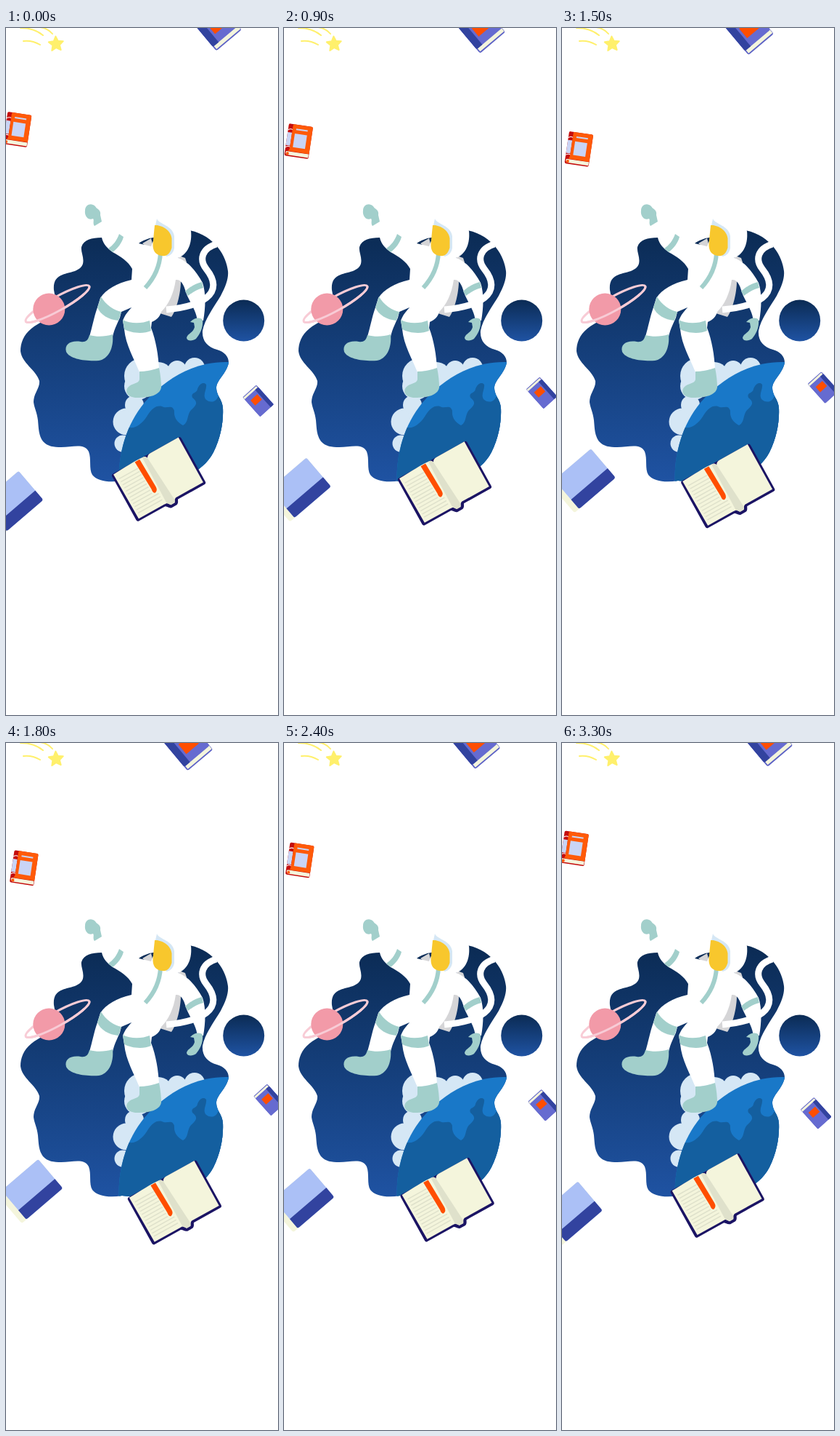
Recreate the animation shown at these times as an HTML page. Size 375x944 px, loop 3600 ms.

```html
<!DOCTYPE html>
<html lang="en">
<head>
<meta charset="utf-8">
<title>Floating books</title>
<style>
  html, body { margin: 0; width: 100%; height: 100%; overflow: hidden; background: #fff; }
  svg { display: block; width: 100%; height: 100%; }
  .teal { fill: #a2cfcb; }
  .cream { fill: #f4f5dc; }
  .line { fill: none; }
</style>
</head>
<body>
<svg viewBox="0 0 375 944" preserveAspectRatio="xMinYMin meet">
  <defs>
    <linearGradient id="night" x1="0" y1="0" x2="0" y2="1">
      <stop offset="0" stop-color="#0b2b54"/>
      <stop offset="1" stop-color="#1f53a3"/>
    </linearGradient>
    <path id="blob" d="M132 288C118 288 107 291 104 301C103 308 108 315 106 324C102 335 88 335 78 339C69 342 65 349 66 360C68 372 71 380 67 389C61 400 46 404 35 413C24 422 20 433 20 444C22 461 41 469 46 485C47 495 38 502 38 514C39 522 43 529 44 539C45 550 45 560 51 568C57 575 66 576 76 576C92 576 108 570 114 582C118 592 114 606 119 614C126 623 143 625 160 622L200 626L250 616C263 609 277 600 286 583C296 563 300 541 299 522C298 510 290 505 290 494C291 483 304 475 307 460C307 451 301 445 291 442C277 438 270 429 271 416C274 400 287 383 296 368C303 355 307 344 306 334C304 314 288 285 253 278L203 288C196 289 188 292 183 296L160 300Z"/>
    <clipPath id="inBlob"><use href="#blob"/></clipPath>
    <clipPath id="inEarth"><path id="earth" d="M308 459C260 457 222 482 196 509C166 541 153 587 156 630H310Z"/></clipPath>
  </defs>

  <g fill="none" stroke="#fff06c" stroke-width="2" stroke-linecap="round">
    <path d="M20 0C33 0 44 4 51 10M47 -1C54 0 60 3 64 8M24 18C32 17 40 19 47 23"/>
  </g>
  <path id="star" fill="#fff06c" stroke="#fff06c" stroke-width="2" stroke-linejoin="round"/>

  <use href="#blob" fill="url(#night)"/>
  <circle cx="327.700" cy="402" r="28.500" fill="url(#night)"/>

  <g clip-path="url(#inBlob)">
    <g fill="#d5e7f5">
      <circle cx="187" cy="478" r="24"/>
      <circle cx="182" cy="492" r="19"/>
      <circle cx="210" cy="479" r="20"/>
      <circle cx="236" cy="470" r="13"/>
      <circle cx="260" cy="467" r="14"/>
      <circle cx="166" cy="541" r="18.500"/>
      <circle cx="177" cy="518" r="13"/>
      <circle cx="161" cy="571" r="11.500"/>
    </g>
    <use href="#earth" fill="#1978c8"/>
    <path clip-path="url(#inEarth)" fill="#145f9f" d="M150 548H168C175 552 186 546 194 534C201 522 208 518 215 520C222 524 229 516 232 526C231 537 238 543 244 546C252 542 249 532 255 525C263 518 265 514 257 508C254 500 263 503 264 496C267 488 273 486 276 490C277 497 271 503 275 510C281 516 290 514 292 507L310 500V640H150Z"/>
  </g>

  <g fill="none" stroke="#f8ccd6" stroke-width="3">
    <g transform="translate(71 379) rotate(-29)">
      <ellipse rx="50" ry="9.500"/>
    </g>
    <circle cx="59.300" cy="386.500" r="22" fill="#f29aa8" stroke="none"/>
    <path transform="translate(71 379) rotate(-29)" d="M-50 0A50 9.500 0 0 0 50 0"/>
  </g>

  <g fill="#d5d5d7">
    <path d="M231 343L241 347C241 365 235 387 228 397L212 392Z"/>
    <path d="M188 296L200 289L203 300L196 302ZM236 312L247 316L249 322L244 327Z"/>
  </g>
  <path class="line" stroke="#fff" stroke-width="9" d="M290 297C270 303 266 318 276 331C288 346 290 360 276 371C264 380 243 385 221 387"/>

  <path fill="#fff" d="M132 280V288C134 297 140 303 147 308C158 314 169 321 174 331L173 346C152 351 138 359 130 371L126 384C121 398 119 411 115 424L147 424C150 412 154 405 157 398L159 390L173 384C168 390 164 394 161 402L163 414C165 436 177 455 184 473L211 468C210 450 207 430 200 412L201 404C208 401 212 397 214 390C224 380 231 366 234 346C241 345 245 352 248 363C252 375 262 386 264 403L272 402C275 385 276 365 271 350C263 336 253 322 238 316L204 290L200 300L183 296L160 280Z"/>

  <g class="teal">
    <path d="M109 251C109 242 118 240 123 245C126 250 131 249 130 257L132 266L122 272C119 268 122 264 120 262C113 265 108 258 109 251Z"/>
    <path d="M156 283C153 292 147 299 141 303L147 308C154 303 160 295 162 287Z"/>
    <path d="M131 369C137 380 149 388 159 390L155 402C142 401 130 394 126 384Z"/>
    <path d="M161 401C172 407 188 406 198 402L200 416C189 421 172 419 163 414Z"/>
    <path d="M115 422C126 425 137 424 147 421C149 440 141 455 128 457C109 458 88 455 83 445C80 434 90 429 103 431C109 432 113 430 115 422Z"/>
    <path d="M184 472C193 472 203 470 211 467C213 476 214 486 214 494C212 505 197 508 181 508C169 508 163 501 168 494C173 488 183 489 184 483Z"/>
    <path d="M247 362C254 355 262 351 270 349L272 357C264 359 257 363 251 368Z"/>
    <path d="M254 404C260 398 267 397 271 401C272 411 268 420 262 427C258 430 250 431 249 426C250 420 258 419 260 411L259 405Z"/>
  </g>
  <path class="line" stroke="#a2cfcb" stroke-width="6" d="M213 309C212 328 205 343 192 357"/>

  <path fill="#fff" d="M206 263C225 254 250 263 255 279C257 298 249 315 231 317L215 306Z"/>
  <path fill="#d5e7f5" d="M208 262C211 270 230 271 232 286V302C231 309 227 313 221 314L206 271Z"/>
  <path fill="#f8c72d" d="M205 271C212 270 227 276 228.500 289V302C226 310 222 314 215 313C206 312 202 306 202.500 296Z"/>

  <g id="atlas"><g transform="translate(145 614) rotate(-29)">
    <rect width="109" height="74" rx="3" fill="#1b1464"/>
    <path fill="#1b1464" d="M43 73H65C63 75 63 79 59 80H51C47 79 47 75 43 73Z"/>
    <path class="cream" d="M3 1C20 0 40 -1 50 0Q54 0 55 4Q57 0 62 0H106V70.500H65C60 70 60 74 58 76H52C49 71 48 71 44 71H4Z"/>
    <path fill="#dfe1cb" d="M49 0Q54 0 55 4L60 72L58 76H52L48 71Z"/>
    <g id="text" stroke="#dfe1cb" stroke-width="1.500"></g>
    <path fill="#ff4e00" d="M37 0.500H44.500L46 44Q46 50 41 51Q38 50 39 44Z"/>
  </g></g>

  <g id="diary"><g transform="translate(2.300 115) rotate(8.600)">
    <rect width="33.500" height="44.500" rx="2" fill="#c40d0d"/>
    <path class="cream" d="M2 38H33V43H3Q0 40 2 38Z"/>
    <rect x="0" y="12" width="6" height="18" fill="#c9d4f6"/>
    <path class="line" stroke="#fff" d="M0 9Q3 6 7 8M0 33Q3 30 7 32"/>
    <path fill="#ff5a08" d="M7 0H32Q33.500 0 33.500 2V37.500H4Q6 36 6 33V3Q6 0 7 0Z"/>
    <rect x="10" y="12.500" width="17" height="19" fill="#c9d4f6"/>
    <path stroke="#c9d4f6" stroke-width="2" d="M11 6.500H27"/>
    <circle cx="4" cy="41" r="2" fill="#ff5a08"/>
  </g></g>

  <g id="novel"></g>
  <g id="pocket"></g>
  <g id="album"></g>
</svg>
<script>
const STEP = 300, LOOP = 3600;
const $ = id => document.getElementById(id);

// Closed book: pages at the bottom edge, spine on the left.
const book = (place, { cover, back, spine, label }) => `
  <g transform="${place}">
    <rect y="-36" width="25.300" height="36" rx="1.500" fill="${back}"/>
    <rect x="1" y="-4.500" width="24" height="3.500" class="cream"/>
    <rect y="-36" width="25.300" height="32" rx="1.200" fill="${cover}"/>
    <path fill="#32439f" d="M${spine} -36H1.500Q0 -36 0 -34.500V-5.500Q0 -4 1 -4H${spine}Z"/>
    ${label ? '<rect x="7.500" y="-20" width="12.500" height="9.500" fill="#ff4e00"/>' : ''}
  </g>`;

const purple = { cover: '#666bd0', back: '#5c61c6', spine: 5.7, label: true };
const pale = { cover: '#abc0f6', back: '#f4f5dc', spine: 8.2, label: false };

$('novel').innerHTML = book('translate(290 31.500) rotate(-40) scale(1.8)', purple);
$('pocket').innerHTML = book('translate(345 490.500) rotate(138)', purple);
$('album').innerHTML = book('translate(-5.300 696.800) rotate(-130.500) scale(2.07 -2.07)', pale);

$('text').innerHTML = Array.from({ length: 12 }, (_, i) =>
  `<path d="M7 ${10 + i * 4.9}H${i < 9 ? 37 : 45}"/>`).join('');

$('star').setAttribute('d', 'M' + Array.from({ length: 10 }, (_, i) => {
  const a = i * Math.PI / 5 - 1.63, r = i % 2 ? 5 : 10.5;
  return `${69 + r * Math.cos(a)} ${22 + r * Math.sin(a)}`;
}).join('L') + 'Z');

// Full drift of each book at the turning point.
const drift = {
  atlas: [21.8, 11.4],
  diary: [9.3, 32.2],
  novel: [-39.6, 6.8],
  pocket: [15, -22],
  album: [27, -36.6]
};

function draw(time) {
  const t = Math.floor(time % LOOP / STEP) * STEP;
  const k = 1 - Math.abs(1 - 2 * t / LOOP);
  for (const id in drift) {
    const [x, y] = drift[id];
    $(id).setAttribute('transform', `translate(${x * k} ${y * k})`);
  }
}

const start = performance.now();
function tick() {
  draw(performance.now() - start);
  requestAnimationFrame(tick);
}
tick();
</script>
</body>
</html>
```
